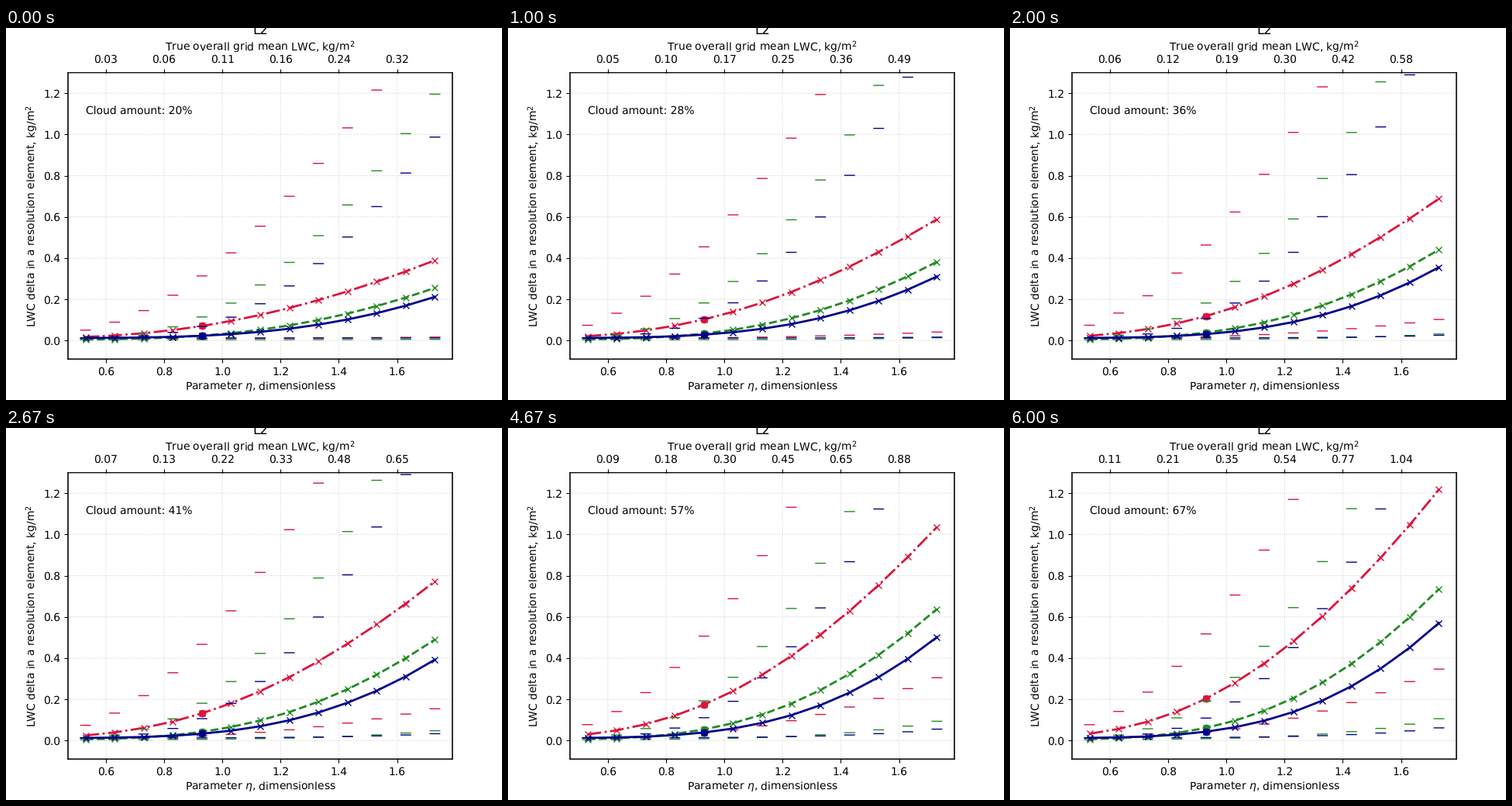
Animation of 640 by 480 pixels, one loop 6.33 s. Source, as a matplotlib script:

```python
import numpy as np
import matplotlib.pyplot as plt
from matplotlib.animation import FuncAnimation

plt.rcParams.update({"path.snap": False, "text.hinting": "no_hinting"})

WIDTH, HEIGHT = 640, 480
FRAMES, LOOP_MS = 19, 6330
KEYS = [0, 3, 6, 11, 14, 18]  # frames of the key values below
GRID_MEAN = [0.32, 0.49, 0.577, 0.76, 0.882, 1.044]
ETA = np.linspace(0.53, 1.73, 13)
TICKS = np.arange(0.6, 1.7, 0.2)
BAR_HALF = 0.0185

# Each shape is (power, bend): a parabola in log-log space.
# share: mean curve relative to the grid mean, at the start and the end
SERIES = [
    dict(color="crimson", style="-.", floor=0.010,
         share=(1.185, 1.157), mean=(2.52, -0.70),
         low_size=0.33, low=(3.27, -0.99),
         high_size=[0.69, 0.972, 1.0, 1.033, 1.122, 1.16], high=(2.583, -0.767)),
    dict(color="forestgreen", style="--", floor=0.004,
         share=(0.785, 0.70), mean=(3.37, -1.18),
         low_size=0.10, low=(5.1, 0.4),
         high_size=[0.375, 0.582, 0.586, 0.588, 0.637, 0.641], high=(3.79, -1.585)),
    dict(color="darkblue", style="-", floor=0.012,
         share=(0.625, 0.535), mean=(3.97, -1.12),
         low_size=0.0485, low=(6, 2),
         high_size=[0.253, 0.416, 0.416, 0.411, 0.443, 0.439], high=(4.6, -2.3)),
]


def shape(reference, power, bend):
    u = np.log(ETA / reference)
    return np.exp(power * u + bend * u ** 2)


def smoothstep(t):
    return t * t * (3 - 2 * t)


def bars(values):
    """Short horizontal dashes, separated by gaps."""
    gap = np.full_like(ETA, np.nan)
    x = np.column_stack([ETA - BAR_HALF, ETA + BAR_HALF, gap])
    y = np.column_stack([values, values, gap])
    return x.ravel(), y.ravel()


fig, ax = plt.subplots(figsize=(WIDTH / 100, HEIGHT / 100), dpi=100)
ax.set(xlim=(0.47, 1.79), ylim=(-0.09, 1.3), xticks=TICKS)
ax.grid(linestyle=":", color="lightgray")
top = ax.twiny()
top.set_xlim(ax.get_xlim())
label = ax.text(0.53, 1.1, "")


def caption(x, baseline, text, **style):
    fig.text(x / WIDTH, 1 - baseline / HEIGHT, text, ha="center", va="baseline",
             rotation_mode="anchor", **style)


caption(328, 8.5, "L2", size=12)
caption(328, 28.5, "True overall grid mean LWC, kg/m$^2$")
caption(328, 467, r"Parameter $\eta$, dimensionless")
caption(38, 242.5, "LWC delta in a resolution element, kg/m$^2$", rotation=90)

artists = []
for s in SERIES:
    line, = ax.plot([], [], s["style"], color=s["color"], lw=2, marker="x")
    dot, = ax.plot([], [], "o", color=s["color"])
    low, high = (ax.plot([], [], color=s["color"], lw=1, solid_capstyle="butt")[0]
                 for _ in range(2))
    artists.append((line, dot, low, high))


def update(frame):
    t = frame / (FRAMES - 1)
    grid_mean = np.interp(frame, KEYS, GRID_MEAN)
    tilt = np.interp(frame, [0, 3, 18], [0.14, 0, 0.16])
    for s, (line, dot, low, high) in zip(SERIES, artists):
        share = np.interp(t, [0, 1], s["share"])
        mean = s["floor"] + share * grid_mean * shape(1.73, *s["mean"])
        line.set_data(ETA, mean)
        dot.set_data(ETA[4:5], mean[4:5])

        low_size = s["low_size"] * (0.02 + smoothstep(t))
        low.set_data(*bars(s["floor"] + low_size * shape(1.73, *s["low"])))

        power, bend = s["high"]
        high_size = np.interp(frame, KEYS, s["high_size"])
        high.set_data(*bars(s["floor"] + high_size * shape(1.23, power + tilt, bend)))

    profile = (TICKS / TICKS[-1]) ** 2.31
    top.set_xticks(TICKS, [f"{value:.2f}" for value in grid_mean * profile])
    label.set_text(f"Cloud amount: {20 + 47 * t:.0f}%")


anim = FuncAnimation(fig, update, frames=FRAMES, interval=LOOP_MS / FRAMES,
                     repeat=True, repeat_delay=0)
plt.show()
```
